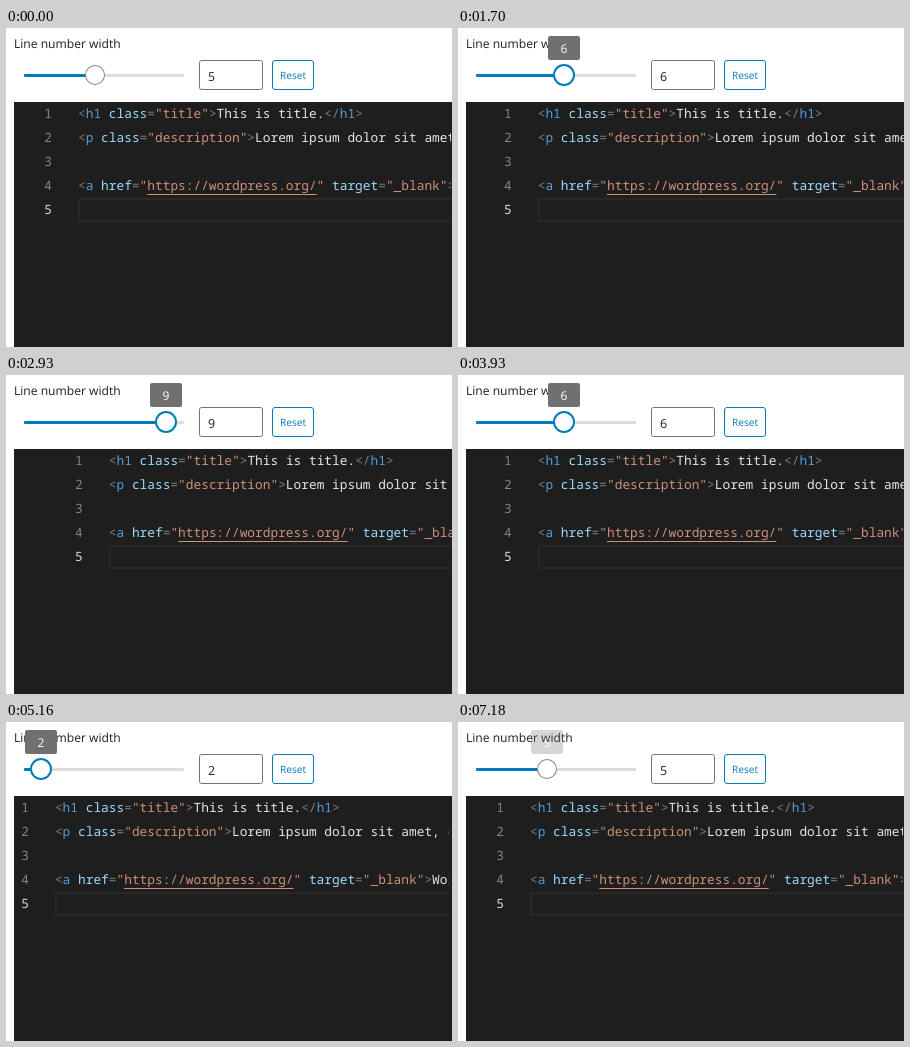
An HTML page that plays this animation: 446 by 319 pixels, repeating every 7210 ms.

```html
<!DOCTYPE html>
<html lang="en">
<head>
<meta charset="utf-8">
<title>Line number width</title>
<style>
  html, body { margin: 0; width: 100%; height: 100%; overflow: hidden; background: #fff; }
  svg { display: block; }
  text { white-space: pre; text-rendering: geometricPrecision; }
  .ui { font-family: "Open Sans", "Noto Sans", sans-serif; fill: #1e1e1e; }
  .mono { font: 12.833px "Noto Sans Mono", "DejaVu Sans Mono", monospace; fill: #e6e6e6; }
  .punct { fill: #808080; }
  .tag { fill: #569cd6; }
  .attr { fill: #9cdcfe; }
  .str { fill: #ce9178; }
  .num { fill: #858585; text-anchor: end; }
  .num.active { fill: #dcdcdc; }
</style>
</head>
<body>
<svg width="446" height="319" viewBox="0 0 446 319">
  <rect width="446" height="319" fill="#fff"/>
  <text class="ui" x="8" y="20" font-size="12.1">Line number width</text>

  <rect x="18" y="46" width="160" height="3" rx="1" fill="#dddddd"/>
  <rect id="fill" x="18" y="46" height="3" rx="1" fill="#007cba"/>
  <circle id="ring" cy="47" r="11" fill="#007cba"/>
  <circle id="thumb" cy="47" r="9.5" fill="#fff"/>
  <g id="tip">
    <rect x="-16" y="8" width="32" height="24" rx="2" fill="#707070"/>
    <text id="tipText" class="ui" y="24.5" font-size="12" font-weight="500" text-anchor="middle" style="fill:#fff"></text>
  </g>

  <rect x="193.5" y="32.5" width="63" height="29" rx="2" fill="#fff" stroke="#757575"/>
  <text id="field" class="ui" x="202" y="53" font-size="12.4"></text>
  <rect x="266.5" y="32.5" width="41" height="29" rx="2.5" fill="#fff" stroke="#007cba"/>
  <text class="ui" x="274" y="51" font-size="10.1" style="fill:#007cba">Reset</text>

  <clipPath id="clip"><rect id="clipBox" x="8" y="74" height="245"/></clipPath>
  <rect x="8" y="74" width="438" height="245" fill="#1e1e1e"/>
  <g clip-path="url(#clip)">
    <g id="code">
      <rect x="1" y="171" width="600" height="22" fill="none" stroke="#282828" stroke-width="2"/>
    </g>
  </g>
</svg>
<script>
const LOOP = 7210, CHAR = 7.7;
const $ = id => document.getElementById(id);

// [time, slider value]
const values = [
  [0, 5], [1700, 6], [2050, 7], [2120, 8], [2190, 9], [2440, 10],
  [2930, 9], [3180, 8], [3430, 7], [3930, 6],
  [4340, 5], [4420, 4], [4500, 3], [4580, 2], [4660, 1],
  [5160, 2], [5240, 3], [5450, 4], [5650, 5]
];
// [time, tooltip opacity]
const fades = [[0, 0], [1180, .2], [1220, .5], [1250, .8], [1290, 1], [7130, .65], [7180, .28]];

const lines = [
  [['punct', '<'], ['tag', 'h1'], ['attr', ' class'], ['punct', '='], ['str', '"title"'],
   ['punct', '>'], ['', 'This is title.'], ['punct', '</'], ['tag', 'h1'], ['punct', '>']],
  [['punct', '<'], ['tag', 'p'], ['attr', ' class'], ['punct', '='], ['str', '"description"'],
   ['punct', '>'], ['', 'Lorem ipsum dolor sit amet, consectetur']],
  [],
  [['punct', '<'], ['tag', 'a'], ['attr', ' href'], ['punct', '='], ['str', '"https://wordpress.org/"'],
   ['attr', ' target'], ['punct', '='], ['str', '"_blank"'], ['punct', '>'], ['', 'WordPress']],
  []
];

function add(parent, name, attrs, content = '') {
  const el = document.createElementNS('http://www.w3.org/2000/svg', name);
  for (const key in attrs) el.setAttribute(key, attrs[key]);
  el.textContent = content;
  parent.appendChild(el);
  return el;
}

function set(id, attrs) {
  for (const key in attrs) $(id).setAttribute(key, attrs[key]);
}

lines.forEach((tokens, i) => {
  const y = 90 + 24 * i;
  add($('code'), 'text', { class: i === 4 ? 'mono num active' : 'mono num', x: -26, y }, i + 1);
  const line = add($('code'), 'text', { class: 'mono', x: 0, y });
  for (const [kind, word] of tokens) add(line, 'tspan', { class: kind }, word);
});
add($('code'), 'rect', { class: 'str', x: 9 * CHAR, y: 166, width: 22 * CHAR, height: 1 });

function at(steps, t) {
  let now = steps[0][1];
  for (const [start, value] of steps) if (t >= start) now = value;
  return now;
}

function draw(t) {
  const value = at(values, t);
  const x = Math.floor(18 + (value - 1) * 160 / 9);
  const focused = t >= 1180 && t < 7130;

  set('fill', { width: x - 18 });
  set('ring', { cx: x, r: focused ? 11 : 10, fill: focused ? '#007cba' : '#7e8993' });
  set('thumb', { cx: x, r: 9 });
  set('tip', { transform: `translate(${x} 0)`, opacity: at(fades, t) });
  $('tipText').textContent = $('field').textContent = value;
  set('code', { transform: `translate(${72 + (value - 5) * CHAR} 0)` });
  set('clipBox', { width: Math.min(446, 441 + .8 * value) - 8 });
}

function tick() {
  draw(performance.now() % LOOP);
  requestAnimationFrame(tick);
}
tick();
</script>
</body>
</html>
```
